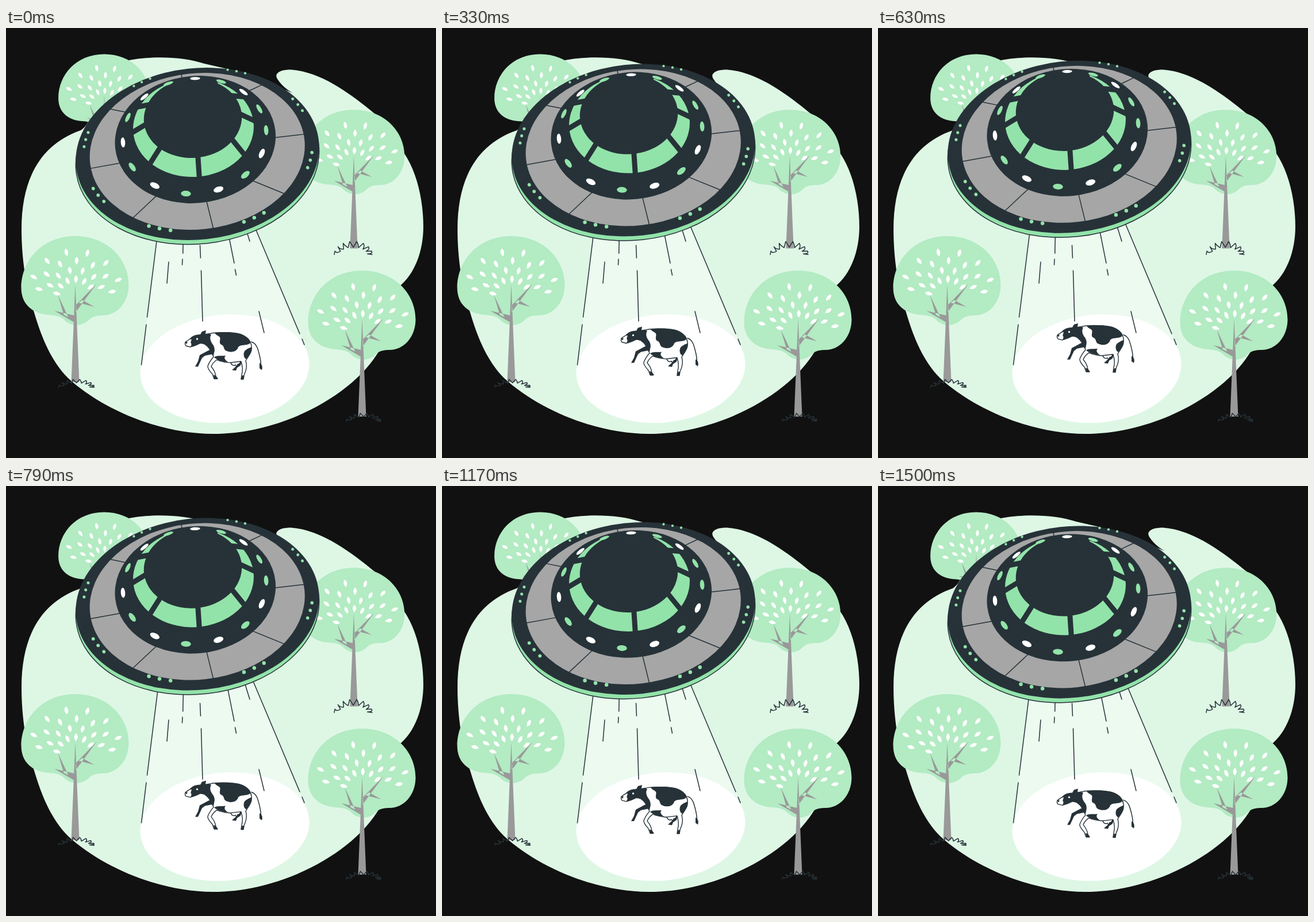
Animation, 748 px wide and 748 px high, one loop 1540 ms. Source, as an HTML page:

```html
<!DOCTYPE html>
<html lang="en">
<head>
<meta charset="utf-8">
<title>Saucer and cow</title>
<style>
  html, body { margin: 0; width: 100%; height: 100%; overflow: hidden; background: #111; }
  svg { display: block; width: 100%; height: 100%; }
  .dark { fill: #263238; }
  .green { fill: #92e3a9; }
  .white { fill: #fff; }
  .grey { fill: #a6a6a6; }
  .line { fill: none; stroke: #263238; stroke-width: 1.5; stroke-linecap: round; stroke-linejoin: round; }
  .bar { fill: none; stroke: #263238; stroke-width: 9; }
  .rim { fill: #92e3a9; stroke: #263238; stroke-width: 1.5; }
  .skin { fill: #fff; stroke: #263238; stroke-width: 1.4; stroke-linejoin: round; }
</style>
</head>
<body>
<svg viewBox="0 0 748 748" xmlns="http://www.w3.org/2000/svg">
  <defs>
    <!-- The tree's zero point is the tip of its trunk. -->
    <g id="tree">
      <path fill="#b3ebc3" d="M-94 6C-94 -41 -58 -84 0 -84C56 -84 93 -44 93 1C93 32 72 54 48 54C30 54 27 59 20 65C10 73 -8 73 -18 63C-24 56 -32 54 -46 53C-75 51 -94 34 -94 6Z"/>
      <g id="leaves" class="white"></g>
      <path fill="#999" d="M0 0L7 170H-7ZM37 -1L1 36V48ZM33 39L6 32L12 27ZM-36 46L-2 54V66ZM-30 19L-20 53L-12 57Z"/>
    </g>
  </defs>

  <path fill="#def7e5" d="M130 178C160 160 150 90 205 58C250 47 310 50 345 62L380 70Q460 94 518 122Q486 110 473 90C463 77 483 71 500 73C550 78 600 115 640 148C670 174 689 210 692 217C716 252 726 303 726 345C726 390 710 428 685 449L650 560C604 640 478 706 360 706C268 706 168 664 108 609C74 575 58 525 49 495C35 455 27 400 27 350C27 265 58 203 130 178Z"/>

  <use href="#tree" transform="translate(171 117) scale(.85)"/>
  <use href="#tree" transform="translate(605 222) scale(.95)"/>
  <use href="#tree" transform="translate(120.500 446)"/>
  <use href="#tree" transform="translate(619.500 506)"/>
  <path id="grass" class="line"/>

  <path fill="#ecfaf0" d="M271 300H413L526 568L500 600H233.500L235.500 584Z"/>
  <ellipse class="white" cx="380.500" cy="592.500" rx="147.300" ry="94" transform="rotate(-5 380.500 592.500)"/>
  <path class="line" d="M264 355L245.500 503M244 516L235.500 586M308.500 355L307.700 392M307 402L306.500 412M283 407L280 444M337.500 378L338.500 400M339.500 422L342 510M386 354L397 409M398.500 420L400.500 430M415 342L424 371M440 493L449 530M428 335L511 532M515 541L519 551"/>

  <g id="cow">
    <path class="line" d="M427 546C437 549 439 561 442 574Q444 584 443 590"/>
    <path class="dark" d="M441 583C445 584 447 590 445 595L441 592Z"/>
    <path class="dark" d="M411 577L408 587L402 591L400 596L393 595L403 586L404 577Z"/>
    <path class="dark" d="M363 556L361 567L346 570L341 574L334 589L329 589L334 580L337 569L352 561Z"/>
    <path class="skin" d="M347 533C365 528 405 528 418 538C426 544 428 552 427 560C426 567 420 573 417 579C420 588 417 598 414 604L413 611H409L410 603Q413 593 409 580C397 585 376 581 367 577C361 581 358 586 357 589Q364 597 365 606L368 610H362L359 602Q350 592 351 588Q354 580 361 572C357 562 352 554 347 551Z"/>
    <path class="skin" d="M391 582C392 587 397 588 399 586L401 589L403 585Q407 585 408 580Z"/>
    <path class="dark" d="M363 530C386 528 409 529 417 537C423 541 427 547 424 549C417 553 408 550 404 555C402 563 391 566 382 561C378 558 380 553 375 551C369 549 374 541 372 538C370 535 364 534 363 530Z"/>
    <path class="dark" d="M427 555C428 565 421 572 418 576C413 574 412 565 416 561Q421 557 427 555Z"/>
    <path class="dark" d="M362 573C366 569 375 571 382 570Q377 575 386 581Q371 580 362 573Z"/>
    <path class="dark" d="M361 603L365 605L368 611H362ZM411 604L414.500 605L413 611H408.500Z"/>
    <path class="dark" d="M320 540Q326 533 338 533L341 528L348 526L347 532Q352 531 357 533Q353 540 358 548Q365 556 362 565L361 570Q355 566 353 556Q346 549 338 549Q330 553 323 555L314 552Z"/>
    <path class="skin" d="M320 541L313 545.500Q310 549 313 553L321 555Q325 551 322 547L324 540Z"/>
    <path class="dark" d="M311 546H316L314 550Z"/>
    <circle class="white" cx="332.500" cy="541" r="1.700"/>
  </g>

  <g id="ship"></g>
</svg>
<script>
const LOOP = 1540, FPS = 24, RISE = 15, LEAD = 30, TILT = -6.2, RAD = Math.PI / 180;
const $ = id => document.getElementById(id);
const sin = deg => Math.sin(deg * RAD), cos = deg => Math.cos(deg * RAD);
const each = (n, make) => Array.from({ length: n }, (_, i) => make(i)).join('');

// A ring is a tilted ellipse: middle, radii, tilt.
const ring = (x, y, a, b, tilt = TILT) => ({ x, y, a, b, tilt });
const ellipse = (r, tone) =>
  `<ellipse class="${tone}" cx="${r.x}" cy="${r.y}" rx="${r.a}" ry="${r.b}" transform="rotate(${r.tilt} ${r.x} ${r.y})"/>`;
const at = (r, deg, k = 1) => {
  const u = k * r.a * cos(deg), v = k * r.b * sin(deg);
  return [r.x + u * cos(r.tilt) - v * sin(r.tilt), r.y + u * sin(r.tilt) + v * cos(r.tilt)];
};
const segment = (p, q) => `M${p}L${q}`;

const hull = ring(333, 219, 212.3, 149.1);
const deck = ring(332.7, 214.5, 187.6, 135.8);
const base = ring(329.3, 194, 140.1, 110.5);
const glass = ring(326, 173.5, 105, 85.5, -3);
const dome = ring(325, 157, 85.3, 69, -4);
const portRing = ring(328, 188, 125, 100);
const lampRing = ring(334, 212, 200, 141);

const spokes = each(8, i => {
  const t = 45 * i - 4;
  return segment(at(deck, t), at(base, t + 10 * cos(t)));
});

// Window bars crowd together towards the back.
const bars = each(7, i => {
  const k = i - 3, t = 87 + 55 * k - 5 * k * Math.abs(k);
  return segment(at(dome, t, .93), at(glass, t, 1.05));
});

const ports = each(15, i => {
  const s = 24 * i + 2, t = s + 6 - 6 * cos(s) - 3 * sin(s);
  const [x, y] = at(portRing, t);
  const turn = Math.atan2(100 * cos(t), -125 * sin(t)) / RAD + TILT;
  return ellipse(ring(x, y, 8.8, 3.8 + 1.2 * sin(t), turn), i % 2 ? 'white' : 'green');
});

const lamps = each(8, i => {
  const mid = 20 + 45 * i - 4 * cos(90 * i), r = 2.7 + .6 * sin(mid);
  return each(3, j => {
    const [x, y] = at(lampRing, mid + (j - 1) * (5.2 + .6 * sin(mid)));
    return ellipse(ring(x, y, r, r), 'green');
  });
});

$('ship').innerHTML = [
  ellipse({ ...hull, y: hull.y + 7.5 }, 'rim'),
  ellipse(hull, 'dark'),
  ellipse(deck, 'grey'),
  `<path class="line" d="${spokes}"/>`,
  ellipse(base, 'dark'),
  ellipse(glass, 'green'),
  `<path class="bar" d="${bars}"/>`,
  ellipse(dome, 'dark'),
  '<path class="dark" d="M291 90Q330 80 368 90V100H291Z"/>',
  ports,
  lamps
].join('');

// Four staggered fans of leaves, all pointing outwards.
$('leaves').innerHTML = each(4, row => each(row === 1 ? 7 : 6, i => {
  const deg = 26 * i - (row % 2 ? 166 : 153), r = 81 - 16 * row;
  return `<path d="M-7 0Q1 -6.500 7 0Q1 6.500 -7 0Z" transform="translate(0 24) rotate(${deg}) translate(${r} 0)"/>`;
}));

// A tuft is a fan of curved blades drawn in one stroke.
const tuft = (x, y, w, h, n = 8) => `M${x - w} ${y}` + each(n, i => {
  const tip = 165 - 150 * i / (n - 1), dip = tip - 11;
  const tx = x + w * cos(tip), ty = y - h * sin(tip);
  const dx = x + w * .75 * cos(dip), dy = y - h * .55 * sin(dip);
  return `L${tx} ${ty}Q${tx + 3} ${ty + h * .2} ${dx} ${dy}`;
}) + `L${x + w} ${y}`;
$('grass').setAttribute('d', tuft(604, 394, 33, 23) + tuft(122.5, 625, 31, 14) + tuft(622, 684, 30, 14));

const lift = t => 1 - Math.abs(1 - 2 * ((t + LEAD) % LOOP) / LOOP);

function draw(now) {
  const step = Math.floor(((now % LOOP) + 3) * FPS / 1000);
  const dy = RISE * (lift(0) - lift(step * 1000 / FPS));
  for (const id of ['ship', 'cow']) $(id).setAttribute('transform', `translate(0 ${dy.toFixed(2)})`);
  requestAnimationFrame(draw);
}
draw(0);
</script>
</body>
</html>
```
